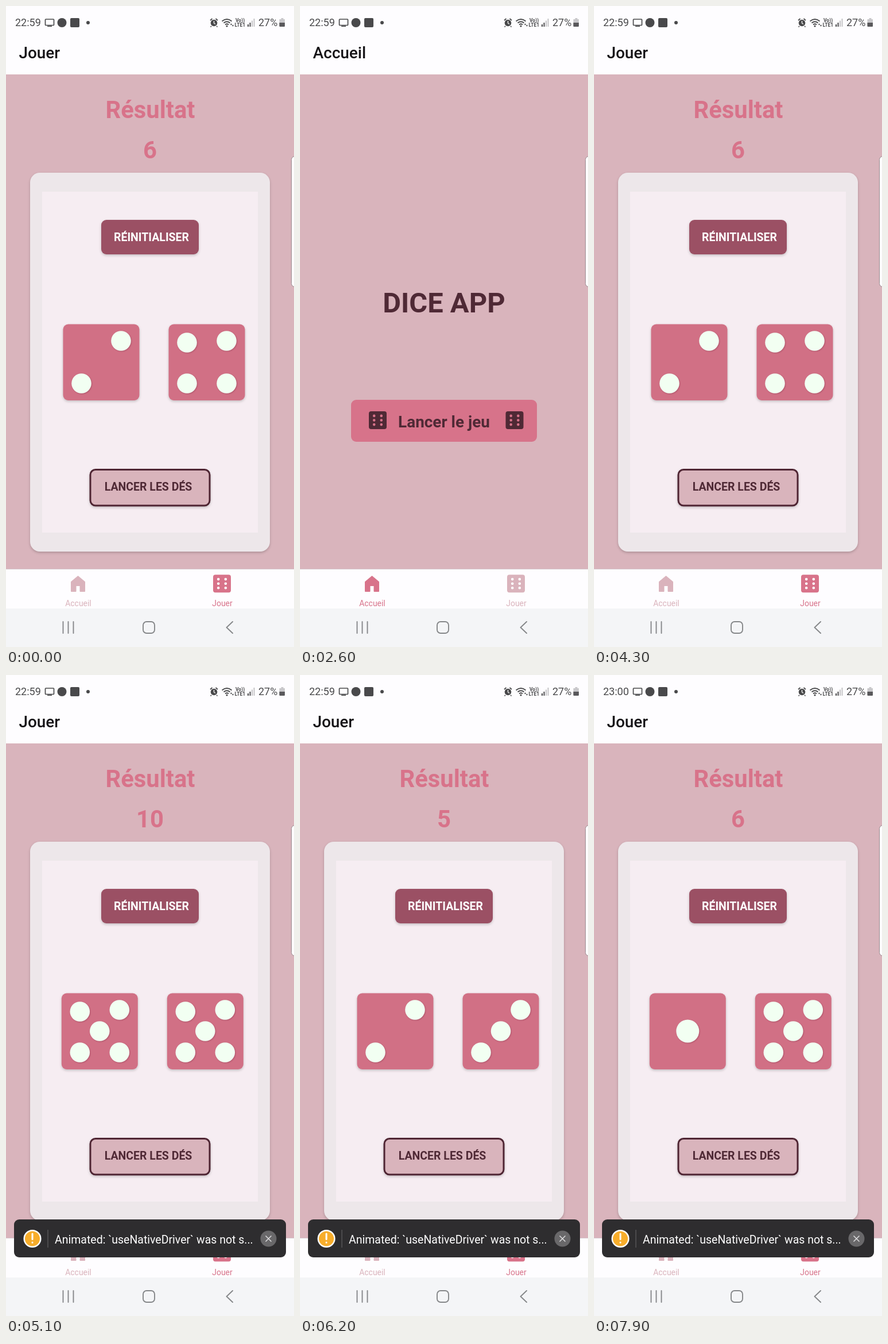
Animation, 502 px wide and 1115 px high, one loop 8 s. Source, as an HTML page:

```html
<!DOCTYPE html>
<html lang="fr">
<head>
<meta charset="utf-8">
<title>Dice app</title>
<style>
  html, body { margin: 0; width: 100%; height: 100%; overflow: hidden; background: #fefdff; }
  svg { display: block; width: 100%; height: 100%; font-family: Roboto, sans-serif; }
  .mid { text-anchor: middle; }
  .bold { font-weight: 700; }
  .title { font-size: 27.9px; font-weight: 500; fill: #161417; }
  .result { font-size: 41.8px; fill: #d8738a; }
  .label { font-size: 19.5px; }
  .tab { font-size: 13.94px; color: #dab3bc; fill: currentColor; --hole: #fff; }
  .tab.active { color: #d8738a; }
  .status { fill: #49494b; }
  .line { fill: none; stroke: #49494b; stroke-width: 1.7; }
  .keys { fill: none; stroke: #858789; stroke-width: 1.9; stroke-linecap: round; stroke-linejoin: round; }
  .soft { filter: drop-shadow(0 2px 2px #0003); }
  .pip { fill: #f2fff2; filter: drop-shadow(1px 1.5px 1px #6b203955); }
</style>
</head>
<body>
<svg viewBox="0 0 502 1115">
  <defs>
    <g id="sixFace">
      <rect x="-15.5" y="-15.5" width="31" height="31" rx="4" fill="currentColor"/>
      <path d="M-6.3-7.6h0M6.3-7.6h0M-6.3 0h0M6.3 0h0M-6.3 7.6h0M6.3 7.6h0"
        stroke="var(--hole)" stroke-width="4.6" stroke-linecap="round"/>
    </g>
  </defs>

  <rect width="502" height="1115" fill="#fefdff"/>
  <rect y="119" width="502" height="861" fill="#d9b4bc"/>

  <g class="status">
    <text id="clock" x="16" y="35" font-size="18">22:59</text>
    <g class="line">
      <rect x="68.5" y="23" width="15" height="10.5" rx="1"/>
      <path d="M72 35.2h8"/>
    </g>
    <circle cx="97.5" cy="29" r="8"/>
    <rect x="112" y="21" width="16" height="16" rx="2"/>
    <circle cx="143" cy="29" r="3"/>
    <circle cx="362.5" cy="29.5" r="5.8"/>
    <path class="line" d="M356 25l3.5-3M369 25l-3.5-3M358 35l-1.5 1.5M367 35l1.5 1.5"/>
    <path d="M362.5 26v4l2.5 1.5" fill="none" stroke="#fff" stroke-width="1.3"/>
    <path class="line" d="M376.5 26.5q8.500-7 17 0M379.500 29.500q5.500-4.500 11 0M382 32.500q3-2.500 6 0"/>
    <circle cx="385" cy="35" r="1.6"/>
    <path d="M391 33l1.5-3 1.5 3zM394 33l1.5 3 1.5-3z"/>
    <text class="bold" x="400" y="27.500" font-size="8.5">Vo))</text>
    <text class="bold" x="398.500" y="36" font-size="8.500">LTE1</text>
    <path d="M421 32h2v4h-2zM424.500 29h2v7h-2z"/>
    <path d="M428 25.500h2v10.500h-2zM431.500 22h2v14h-2z" fill="#c4c3c6"/>
    <text x="440" y="35" font-size="18">27%</text>
    <path d="M479.500 21h4v2h2.500v13h-9.500v-13h3z" fill="#c9c8cb"/>
    <path d="M476.500 29h9.500v5.500q0 1.500-1.500 1.500h-6.500q-1.500 0-1.500-1.500z" fill="#59585b"/>
  </g>

  <text id="title" class="title" x="22.500" y="91"></text>

  <g id="home" class="bold" fill="#4f2935">
    <text class="mid" x="251" y="533" font-size="48.800">DICE APP</text>
    <rect x="89" y="685" width="324" height="73" rx="9" fill="#d7738a"/>
    <text class="mid" x="251" y="733" font-size="27.900">Lancer le jeu</text>
    <g color="#4f2935" style="--hole:#d7738a">
      <use href="#sixFace" x="135.500" y="720.500"/>
      <use href="#sixFace" x="374" y="720.500"/>
    </g>
  </g>

  <g id="play" class="bold">
    <text class="result mid" x="251.500" y="195">Résultat</text>
    <text id="total" class="result mid" x="251" y="265"></text>
    <rect class="soft" x="42" y="290" width="418" height="659" rx="17" fill="#ede7ea"/>
    <rect x="63" y="323" width="376" height="593" fill="#f6edf2"/>
    <rect class="soft" x="166" y="372" width="170" height="60" rx="9" fill="#9b5064"/>
    <text class="label mid" x="253.500" y="409" fill="#fff">RÉINITIALISER</text>
    <g id="dice"></g>
    <rect class="soft" x="147" y="806.500" width="208" height="62.500" rx="9"
      fill="#d9b4bc" stroke="#4f2533" stroke-width="3"/>
    <text class="label mid" x="248" y="842.500" fill="#4f2935">LANCER LES DÉS</text>
  </g>

  <rect x="497.500" y="261.500" width="20" height="227" rx="6" fill="#fefdff" stroke="#98898e"/>

  <rect y="979" width="502" height="1.500" fill="#d5c6cc"/>
  <rect y="980" width="502" height="68" fill="#fefdff"/>
  <g id="homeTab" class="tab">
    <path d="M125.500 991.500L137.500 1001.500V1018.500H129V1008.500H122V1018.500H113.500V1001.500Z"
      stroke="currentColor" stroke-linejoin="round"/>
    <text class="mid" x="126" y="1044">Accueil</text>
  </g>
  <g id="playTab" class="tab">
    <use href="#sixFace" x="376.500" y="1004.700"/>
    <text class="mid" x="377" y="1044">Jouer</text>
  </g>

  <rect y="1048" width="502" height="67" fill="#f4f5f7"/>
  <g class="keys">
    <path d="M99.500 1071v20M108.500 1071v20M117.500 1071v20M395 1071l-10.500 10 10.500 10"/>
    <rect x="239" y="1071" width="20" height="20" rx="6"/>
  </g>

  <g id="toast">
    <rect x="14" y="947" width="474" height="66" rx="9" fill="#2e2d2f"/>
    <circle cx="46" cy="980.500" r="14.300" fill="#f7ad2b" stroke="#fff" stroke-width="2.500"/>
    <path d="M46 972v9.500M46 987v.2" stroke="#fff" stroke-width="3" stroke-linecap="round"/>
    <path d="M73 965v31" stroke="#59585a" stroke-width="1.400"/>
    <text class="label" x="85" y="988.500" fill="#fff">Animated: `useNativeDriver` was not s...</text>
    <circle cx="457.500" cy="980.500" r="14" fill="#69686a"/>
    <path d="M452.500 975.500l10 10m0-10l-10 10" stroke="#dddcde" stroke-width="1.500"/>
  </g>
</svg>

<script>
  const LOOP = 8000;
  const SHAKE = [6, 4, -2.700, 3, 0];
  const byId = id => document.getElementById(id);

  // Values held from each moment on; a roll also starts a shake.
  const timeline = [
    { at: 0, dice: [2, 4], total: 6 },
    { at: 600, home: true },
    { at: 3300, dice: [2, 4], total: 6 },
    { at: 4900, dice: [5, 5], total: 10, roll: true },
    { at: 5800, dice: [2, 3], total: 5, roll: true },
    { at: 6700, dice: [1, 1], total: 0 },
    { at: 7700, dice: [1, 5], total: 6, roll: true }
  ];

  function pip(x, y, r = 17.300) {
    return `<circle class="pip" cx="${x}" cy="${y}" r="${r}"/>`;
  }

  function die(value, x) {
    let pips = '';
    if (value > 1) pips += pip(101, 29) + pip(32, 103);
    if (value > 3) pips += pip(32, 32) + pip(101, 103);
    if (value % 2) pips += pip(66.500, 66, value === 1 ? 20 : 17.300);
    return `<g transform="translate(${x} 553.500)">
      <rect class="soft" width="133" height="132.500" rx="9" fill="#d17085"/>${pips}</g>`;
  }

  let shown;
  function show(state) {
    if (state === shown) return;
    shown = state;
    const home = Boolean(state.home);
    byId('title').textContent = home ? 'Accueil' : 'Jouer';
    byId('home').style.display = home ? '' : 'none';
    byId('play').style.display = home ? 'none' : '';
    byId('homeTab').classList.toggle('active', home);
    byId('playTab').classList.toggle('active', !home);
    if (home) return;
    byId('total').textContent = state.total;
    byId('dice').innerHTML = die(state.dice[0], 99.500) + die(state.dice[1], 283.500);
  }

  function render() {
    const t = performance.now() % LOOP;
    const state = timeline.findLast(s => s.at <= t);
    show(state);
    const step = Math.floor((t - state.at) / 100);
    const shift = state.roll ? SHAKE[step] || 0 : 0;
    byId('dice').setAttribute('transform', `translate(${shift} 0)`);
    byId('toast').style.display = t >= 4900 ? '' : 'none';
    byId('clock').textContent = t >= 7500 ? '23:00' : '22:59';
    requestAnimationFrame(render);
  }
  render();
</script>
</body>
</html>
```
